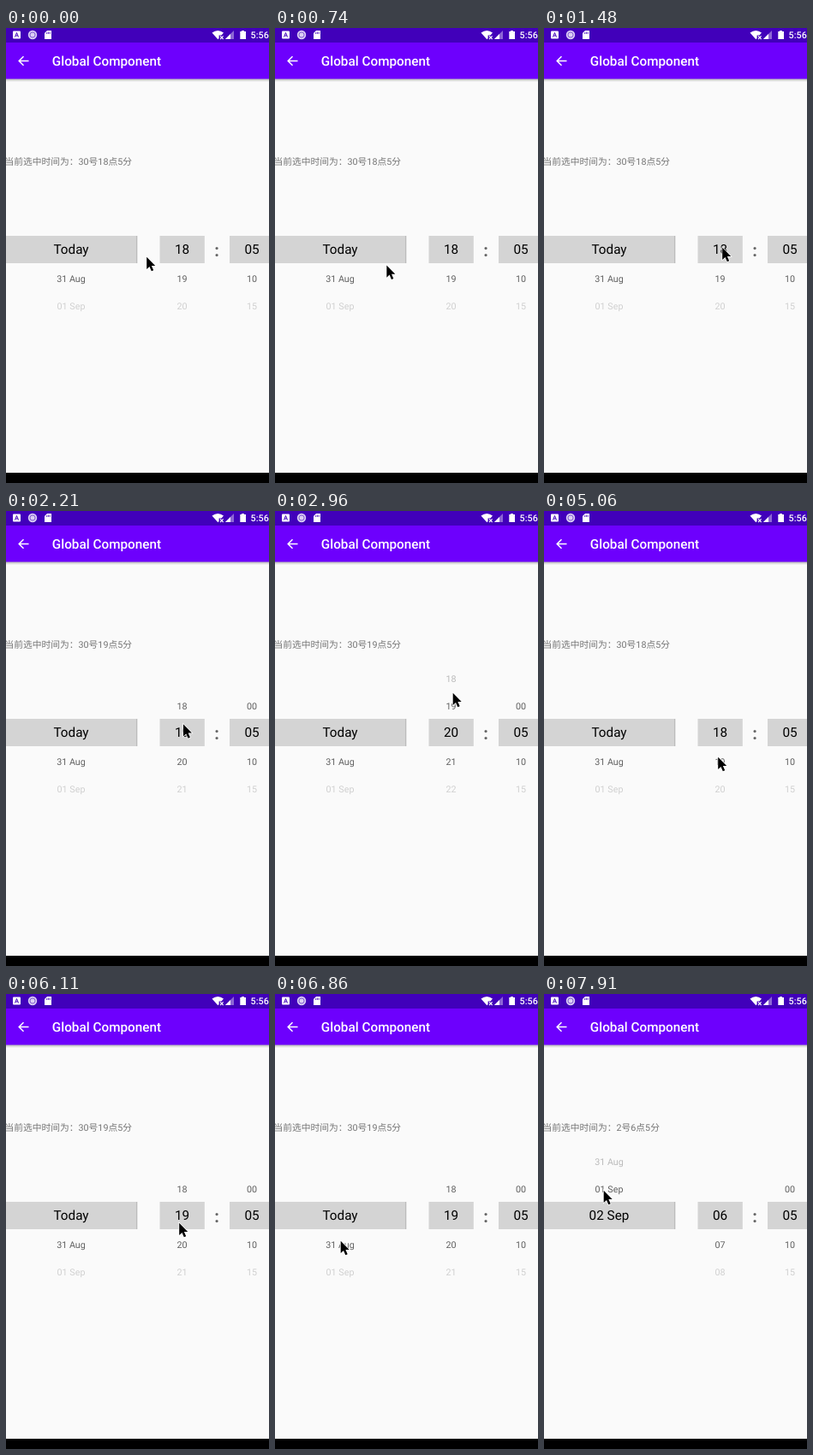
An HTML page that plays this animation: 307x532 px, repeating every 8000 ms.

```html
<!DOCTYPE html>
<html lang="zh-CN">
<head>
<meta charset="utf-8">
<title>Time picker</title>
<style>
  html, body { margin: 0; width: 100%; height: 100%; overflow: hidden; background: #fafafa; }
  svg { display: block; width: 100%; height: 100%; }
  text { font-family: Roboto, "Noto Sans CJK SC", "Noto Sans CJK", sans-serif; text-rendering: geometricPrecision; white-space: pre; }
  .wheel { text-anchor: middle; }
  .bold { font-weight: 500; }
</style>
</head>
<body>
<svg viewBox="0 0 307 532">
  <defs>
    <linearGradient id="shade" x2="0" y2="1">
      <stop stop-color="#000" stop-opacity=".3"/>
      <stop offset="1" stop-color="#000" stop-opacity="0"/>
    </linearGradient>
  </defs>
  <rect width="307" height="532" fill="#fafafa"/>
  <rect y="59" width="307" height="4" fill="url(#shade)"/>
  <rect y="17" width="307" height="42.5" fill="#6d00fd"/>
  <rect width="307" height="17" fill="#4100ba"/>
  <rect y="520" width="307" height="12" fill="#000"/>

  <!-- status bar and title -->
  <g fill="#fff">
    <rect x="8" y="3.5" width="9" height="9" rx="1"/>
    <path d="M10.5 10.5L12.5 5.5L14.5 10.5M11.2 9H13.8" fill="none" stroke="#4100ba"/>
    <circle cx="31" cy="8" r="5.2" fill="#dcd0f5"/>
    <circle cx="31" cy="8" r="3.1" fill="none" stroke="#7d55cf"/>
    <path d="M48 3H53V13H45V6Z"/>
    <path d="M47.7 5V7M49.4 4.5V7M51.2 4.5V7" stroke="#4100ba" stroke-width=".8"/>
    <path d="M240.5 5.5Q247.3 .5 254 5.5L251.5 8.4H248.6V12L247.3 13.3Z"/>
    <path d="M250 9.3L253.6 13M253.6 9.3L250 13" stroke="#fff" stroke-width="1.1"/>
    <path d="M266 3V13H256Z" opacity=".4"/>
    <path d="M262 7V13H256Z"/>
    <path d="M275 3H278V4H280V13H273.3V4H275Z"/>
    <text class="bold" x="285.6" y="12" font-size="10.75">5:56</text>
    <path d="M26.5 38.5H15.5M20.5 33.2L15.2 38.5L20.5 43.8" fill="none" stroke="#fff" stroke-width="1.5"/>
    <text class="bold" x="53.8" y="44.3" font-size="15.3">Global Component</text>
  </g>

  <text id="label" x="-1.5" y="160" font-size="10.75" fill="#757575"></text>

  <path d="M0 243H153V275H0ZM179.5 243H231.8V275H179.5ZM261 243H307V275H261Z" fill="#d4d4d4"/>
  <path d="M152.8 243V275" stroke="#aaa" stroke-width=".8"/>
  <text class="wheel" x="246" y="267.3" font-size="20" font-weight="700" fill="#666">:</text>
  <g id="wheels" class="wheel"></g>

  <path id="cursor" d="M.7 .7V15L4 11.9L6.3 17.3L8.7 16.3L6.4 11H10.7Z"
        stroke="#fff" stroke-width="1.4" paint-order="stroke"/>
</svg>
<script>
const LOOP = 8000;
const $ = id => document.getElementById(id);
const pad = n => String(n).padStart(2, '0');
const clamp = v => Math.min(1, Math.max(0, v));
const series = (first, step = 1) => Array.from({ length: 7 }, (_, i) => pad(first + i * step));
const dates = ['Today', '31 Aug', '01 Sep', '02 Sep'];

// Moves run between two steps and end at the given values
const pointerMoves = [
  [0, 3, 99, 285], [3, 10, 208, 256],                        // wander, then reach the hour
  [10, 13, 207.5, 238], [14, 16, 206, 259],                  // flick up, return
  [17, 20, 207.5, 212], [20, 23, 208, 226],                  // longer flick up
  [24, 27.4, 212, 310], [31, 34, 203, 287],                  // drag down, settle
  [36, 41, 202, 267], [41, 46, 76.5, 288],                   // flick up, go to the date
  [47, 49, 77, 174], [51, 53, 69.5, 229]                     // drag the date
];
const hourMoves = [[10, 13, 19], [17, 23, 21], [24, 27.8, 18], [36, 39, 19]];
const dateMoves = [[47, 49, 3]];

const stepAt = t => Math.floor(t < 2210 ? (t + 8) / 147.8 : (t + 40) / 150);

const follow = (start, moves, k) => moves.reduce((pos, [from, to, ...end]) =>
  pos.map((v, i) => v + (end[i] - v) * clamp((k - from) / (to - from))), start);

function wheel(x, items, pos) {
  return items.map((item, i) => {
    const d = i - pos, far = Math.abs(d), near = Math.max(0, 1 - far);
    const alpha = far < 1 ? 1 - 0.38 * far : 0.62 - (d < 0 ? 0.36 : 0.45) * (far - 1);
    if (far > 2.3 || alpha <= 0) return '';
    const size = 10.75 + 4.55 * near;
    const y = 260.6 + 32.3 * d - 1.6 * near + 0.355 * size;
    return `<text x="${x}" y="${y}" font-size="${size}" fill-opacity="${alpha}">${item}</text>`;
  }).join('');
}

function draw(k) {
  const [x, y] = follow([164, 267], pointerMoves, k);
  const [date] = follow([0], dateMoves, k);
  const lastDay = date === 3;
  const firstHour = lastDay ? 6 : 18;
  const [hour] = lastDay ? [6] : follow([18], hourMoves, k);
  // The label takes a value only once its wheel has stopped
  const [settled] = follow([18], hourMoves.filter(m => m[1] <= k), k);
  const chosen = lastDay ? 6 : settled;
  const firstMinute = chosen === 18 ? 5 : 0;

  $('label').textContent = `当前选中时间为：${lastDay ? 2 : 30}号${chosen}点5分`;
  $('wheels').innerHTML =
    wheel(76, dates, date) +
    wheel(205.5, series(firstHour), hour - firstHour) +
    wheel(287, series(firstMinute, 5), 1 - firstMinute / 5);
  $('cursor').setAttribute('transform', `translate(${x - 0.5} ${y})`);
}

let shown = -1;
const begin = performance.now();
function tick() {
  const k = stepAt((performance.now() - begin) % LOOP);
  if (k !== shown) draw(shown = k);
  requestAnimationFrame(tick);
}
tick();
</script>
</body>
</html>
```
